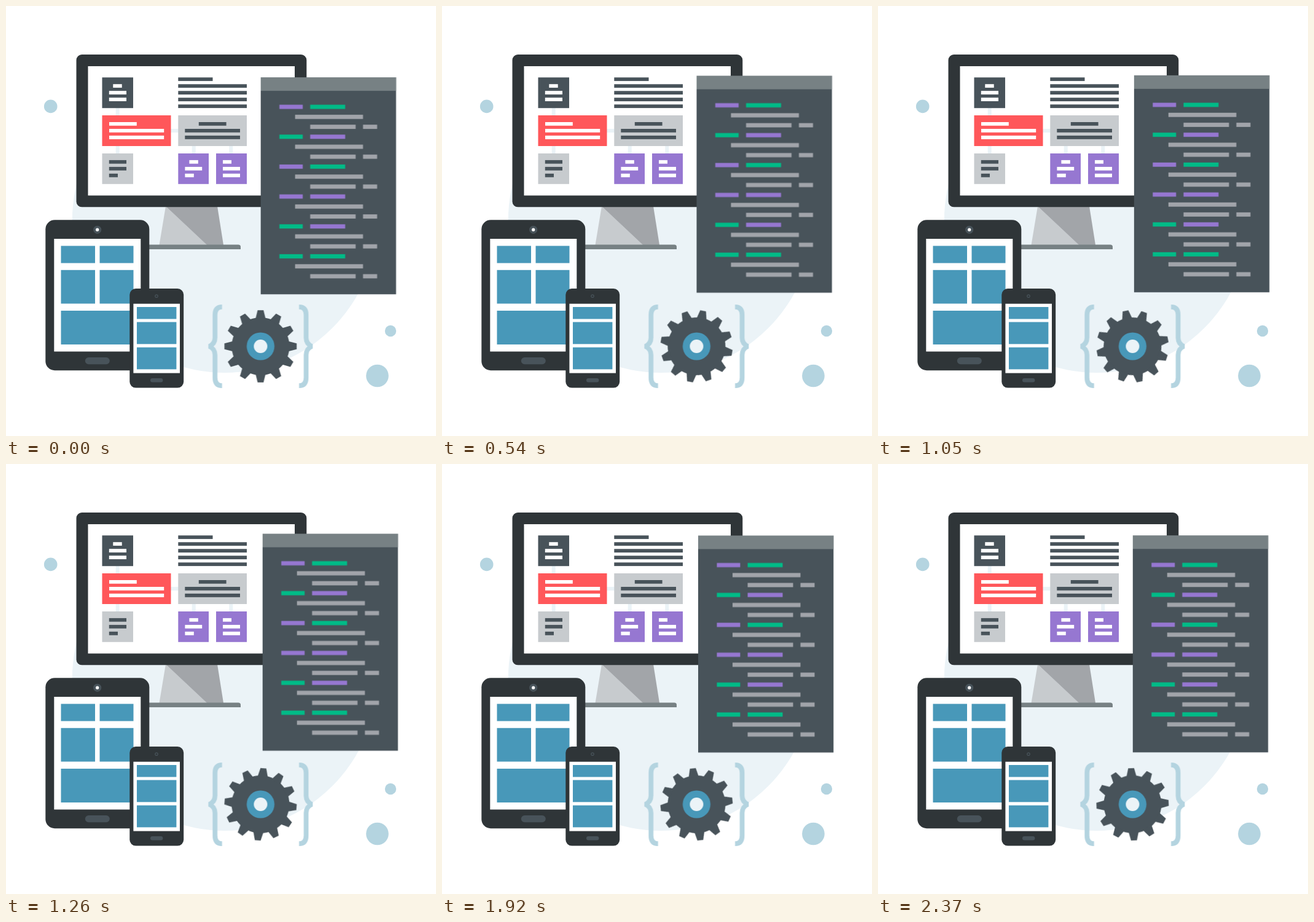
Write an HTML page that moves like this. It is 700 px wide and 700 px high and loops after 2400 ms.

```html
<!DOCTYPE html>
<html lang="en">
<head>
<meta charset="utf-8">
<title>Web development</title>
<style>
  html, body { margin: 0; width: 100%; height: 100%; overflow: hidden; background: #fff; }
  svg { display: block; width: 100%; height: 100%; }
</style>
</head>
<body>
<svg id="stage" viewBox="0 0 700 700"></svg>
<script>
const LOOP = 2400, STEPS = 80;
const INK = '#2f3538', SLATE = '#48535a', STEEL = '#778184', GREY = '#c7cbce', MID = '#a1a4aa',
  PALE = '#ebf3f7', SKY = '#b4d4e0', BLUE = '#4898b9', RED = '#ff575a', PURPLE = '#9677d1',
  GREEN = '#00bb87', WHITE = '#fff';

const stage = document.getElementById('stage');

function add(parent, tag, attrs) {
  const el = document.createElementNS('http://www.w3.org/2000/svg', tag);
  for (const name in attrs) el.setAttribute(name, attrs[name]);
  return parent.appendChild(el);
}
const box = (fill, x1, y1, x2, y2, rx = 0, parent = stage) =>
  add(parent, 'rect', { x: x1, y: y1, width: x2 - x1, height: y2 - y1, rx, fill });
const dot = (fill, cx, cy, r, parent = stage) => add(parent, 'circle', { cx, cy, r, fill });
const path = (fill, d, parent = stage) => add(parent, 'path', { d, fill });
const group = (parent, x = 0, y = 0) => add(parent, 'g', { transform: `translate(${x} ${y})` });

// Stacked text bars, 11 units apart; spans are [from, to] pairs.
function bars(fill, y, spans) {
  spans.forEach(([x1, x2], i) => box(fill, x1, y + i * 11, x2, y + i * 11 + 5.8));
}

function backdrop() {
  dot(PALE, 355.8, 349, 248);
  dot(SKY, 72.7, 163.4, 10.8);
  dot(SKY, 626, 529, 9.2);
  dot(SKY, 604.5, 602, 18.3);
}

function monitor() {
  path(GREY, 'M260 326L327 389H249.5Z');
  path('#a2a5a9', 'M260 326H344L354 389H327Z');
  path(STEEL, 'M200 388.5H378Q382 388.5 382 392V396H200Z');
  box(INK, 114.5, 79, 489.3, 327.3, 9);
  box(WHITE, 133.5, 98, 470, 308.5);

  box(PALE, 178.7, 166, 184.7, 240);
  box(PALE, 268, 200, 281, 206);
  box(PALE, 302.7, 228, 308.7, 240);
  box(PALE, 363.3, 228, 369.3, 240);

  box(SLATE, 156.5, 116.3, 207, 166.2);
  bars(WHITE, 127.2, [[174.3, 188.7], [167.8, 196], [167.8, 196]]);
  box(RED, 156.5, 178, 268.5, 228);
  bars(WHITE, 189, [[168, 212.8], [168, 257.2], [168, 257.2]]);
  box(GREY, 156.5, 240, 207, 289.8);
  bars(SLATE, 250.9, [[167.8, 196], [167.8, 196], [167.8, 182]]);
  bars(SLATE, 116.3, [[280.3, 336.5], [280.3, 392], [280.3, 392], [280.3, 392], [280.3, 392]]);
  box(GREY, 280.3, 178, 392, 228);
  bars(SLATE, 189, [[313.8, 358.6], [291.3, 381], [291.3, 381]]);
  box(PURPLE, 280.3, 240, 330, 289.8);
  bars(WHITE, 250.9, [[298.4, 312.8], [291.4, 319.2], [291.4, 305.8]]);
  box(PURPLE, 342, 240, 392, 289.8);
  bars(WHITE, 250.9, [[353, 367], [353, 381], [353, 381]]);
}

function tablet() {
  box(INK, 64.3, 348.3, 233.3, 593.2, 15);
  box(WHITE, 78.3, 379, 219.3, 562.5);
  dot(SLATE, 148.7, 364.2, 6.5);
  dot(WHITE, 148.7, 364.2, 2.6);
  box(SLATE, 128.8, 572, 168.8, 583.2, 5.6);
  for (const [y1, y2] of [[390.5, 418.5], [429.8, 484.5]]) {
    box(BLUE, 89.5, y1, 145, y2);
    box(BLUE, 152.5, y1, 207.5, y2);
  }
  box(BLUE, 89.5, 496, 207.5, 551);
}

function phone() {
  box(INK, 201.3, 460, 289.2, 621.6, 10);
  box(WHITE, 207.4, 484.7, 283, 597.6);
  dot(SLATE, 245, 472.2, 2.8);
  dot(INK, 245, 472.2, 1.5);
  box(SLATE, 235, 606, 255.4, 612.6, 3.3);
  for (const [y1, y2] of [[490, 509.5], [514.5, 550.3], [555.7, 591.4]])
    box(BLUE, 213, y1, 277.4, y2);
}

function codePanel() {
  const panel = group(group(stage, 416.1, 114.7));
  box(SLATE, 0, 0, 220.3, 353.2, 0, panel);
  box(STEEL, 0, 0, 220.3, 22, 0, panel);
  const row = (fill, y, x, w) => box(fill, x, y, x + w, y + 6.9, 0, panel);
  const tags = [[PURPLE, GREEN], [GREEN, PURPLE], [PURPLE, GREEN],
    [PURPLE, PURPLE], [GREEN, PURPLE], [GREEN, GREEN]];
  tags.forEach(([first, second], i) => {
    const y = 44.6 + i * 48.66;
    row(first, y, 30.4, 38);
    row(second, y, 80.5, 57);
    row(MID, y + 16.3, 55.9, 110.6);
    row(MID, y + 32.5, 80.5, 74);
    row(MID, y + 32.5, 166.5, 23);
  });
  return panel;
}

function gear() {
  const hub = group(stage, 414.4, 554);
  const brace = 'M-62.7 -64.2Q-74.2 -64.2 -74.2 -51V-14Q-74.2 -4 -83.5 0Q-74.2 4 -74.2 14V51Q-74.2 64.2 -62.7 64.2';
  for (const side of [1, -1])
    add(hub, 'path', { d: brace, fill: 'none', stroke: SKY, 'stroke-width': 7.8,
      'stroke-linejoin': 'bevel', transform: `scale(${side} 1)` });

  const wheel = group(hub);
  dot(SLATE, 0, 0, 47, wheel);
  for (let a = 0; a < 360; a += 30)
    path(SLATE, 'M-8.4 -44L-4.8 -58.8H4.8L8.4 -44Z', wheel).setAttribute('transform', `rotate(${a})`);
  dot(BLUE, 0, 0, 22.6, hub);
  dot(PALE, 0, 0, 11, hub);
  return wheel;
}

function loop(el, from, to) {
  el.animate([{ transform: from }, { transform: to }],
    { duration: LOOP, iterations: Infinity, easing: `steps(${STEPS})` });
}

backdrop();
monitor();
tablet();
phone();
const panel = codePanel();
const wheel = gear();

// The panel drifts on a small circle without turning.
const orbit = deg => `rotate(${deg}deg) translate(2px, 0px) rotate(${-deg}deg)`;
loop(panel, orbit(135), orbit(495));
loop(wheel, 'rotate(0deg)', 'rotate(180deg)');
</script>
</body>
</html>
```
